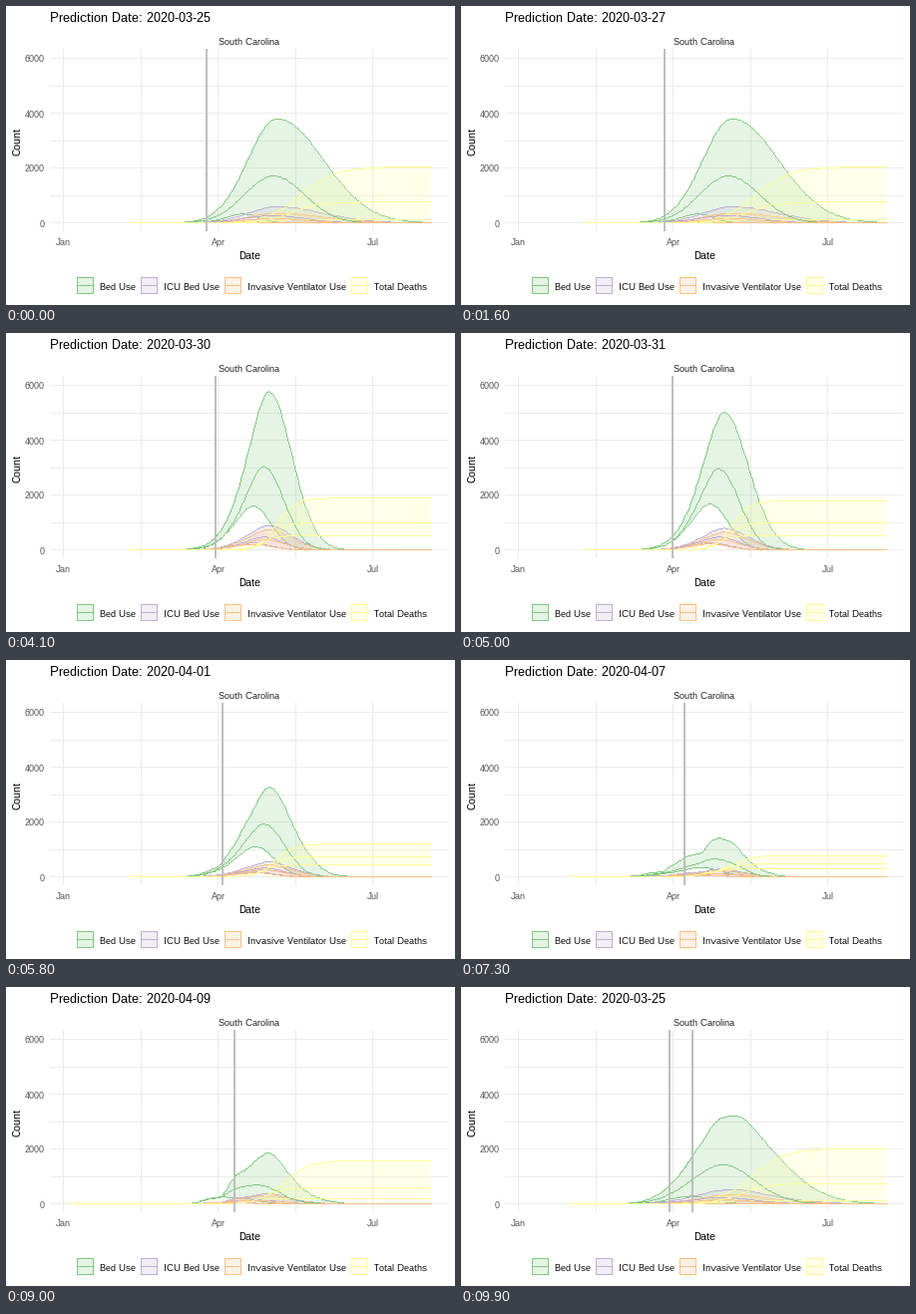
A matplotlib script that plays this animation: 450 px wide and 300 px high, repeating every 10000 ms.

```python
import numpy as np
import matplotlib.pyplot as plt
from matplotlib.animation import FuncAnimation
from matplotlib.patches import Rectangle

plt.rcParams.update({
    "font.family": "Liberation Sans",
    "text.hinting": "default",
    "text.hinting_factor": 1,
})

W, H, DPI = 450, 300, 100
STEP = 100
FRAMES = 100
DAY = 1.705              # pixels per day
JAN = 57.53              # pixel of January 1
LAST_DAY = 216
ZERO, PER_COUNT = 217.7, 0.0275

# name, colour, key x, label x
GROUPS = [("Bed Use", "#7FC97F", 71, 94),
          ("ICU Bed Use", "#BEAED4", 135, 158),
          ("Invasive Ventilator Use", "#FDC086", 219, 242),
          ("Total Deaths", "#FFFF99", 346, 369)]


# ---- curve shapes, all functions of pixel x ----
def bell(peak, mid, left, right, power=1.7):
    def f(x):
        z = np.where(x < mid, (mid - x) / left, (x - mid) / right)
        return peak * np.exp(-0.5 * z ** np.where(x < mid, power, 2))
    return f


def rise(top, mid, width):
    return lambda x: top / (1 + np.exp(-(x - mid) / width))


def knots(xs, ys):
    def f(x):
        y = np.interp(x, xs, ys)
        return np.convolve(np.pad(y, 1, mode="edge"), [0.25, 0.5, 0.25], "valid")
    return f


def scaled(f, k):
    return lambda x: k * f(x)


def forecast(start, bed, icu, vent, deaths):
    """Four arrays with the columns day, mean, low, high."""
    day = np.arange(start, LAST_DAY + 1.0)
    x = JAN + DAY * day
    sets = [bed, [scaled(f, icu) for f in bed],
            [scaled(f, vent) for f in bed], deaths]
    return [np.column_stack([day] + [f(x) for f in s]) for s in sets]


PAST_X, PAST_Y = [178, 190, 200, 215], [0, 50, 180, 260]


def split(xs, ys):
    return knots(PAST_X + xs, PAST_Y + ys)


mid_high = split([219, 235, 250, 258, 266, 275, 285, 300, 320],
                 [460, 940, 1100, 1450, 1500, 1110, 520, 170, 0])
late_high = split([218, 229, 240, 250, 257, 262, 266, 271, 280, 293, 305, 320, 342],
                  [420, 1070, 1290, 1650, 1860, 1925, 1880, 1690, 1250, 670, 345, 120, 0])
late_mean = split([222, 232, 245, 252, 258, 270, 285, 300, 325],
                  [480, 640, 735, 745, 725, 530, 200, 60, 0])
late_low = split([225, 240, 255, 275], [230, 200, 90, 0])
late_bed = [late_mean, late_low, late_high]

A = forecast(38, [bell(1720, 267, 29, 31, 2), bell(330, 237, 18, 15, 2),
                  bell(3800, 271, 29.5, 46, 2)], 0.155, 0.092,
             [rise(760, 285, 14), rise(110, 262, 8), rise(2040, 294, 17)])
B = forecast(38, [bell(3270, 254, 20, 20), bell(2290, 246, 18, 17),
                  bell(4790, 258, 21, 24)], 0.158, 0.115,
             [rise(1020, 265, 8), rise(670, 256, 7), rise(1560, 270, 10)])
C = forecast(38, [bell(3150, 257, 19, 20), bell(1650, 246, 18, 18),
                  bell(6050, 262, 20.5, 23)], 0.155, 0.128,
             [rise(1010, 266, 8), rise(520, 256, 7), rise(1910, 270, 9)])
D = forecast(38, [bell(2750, 257, 19, 20), bell(1530, 247, 18, 18),
                  bell(4970, 262, 20.5, 24)], 0.155, 0.128,
             [rise(980, 266, 8), rise(500, 256, 7), rise(1830, 270, 9)])
E = forecast(38, [bell(3200, 257, 20, 21), bell(1850, 249, 19, 19),
                  bell(5080, 262, 21, 26)], 0.16, 0.13,
             [rise(1020, 266, 8), rise(540, 257, 7), rise(1760, 270, 9)])
F = forecast(38, [bell(680, 258, 26, 19), bell(380, 248, 24, 18), mid_high],
             0.2, 0.16,
             [rise(460, 258, 9), rise(320, 250, 8), rise(640, 264, 10)])
G = forecast(3, late_bed, 0.2, 0.17,
             [rise(500, 256, 9), rise(200, 243, 8), rise(1200, 270, 11)])
I = forecast(3, [scaled(late_mean, 0.85), late_low, scaled(late_high, 0.95)],
             0.2, 0.17,
             [rise(700, 262, 10), rise(200, 245, 8), rise(1960, 282, 13)])

# first frame of the move away, day of year, label, data
STATES = [(5, 84, "03-25", A), (14, 85, "03-26", A), (23, 86, "03-27", A),
          (32, 88, "03-29", B), (41, 89, "03-30", C), (49, 90, "03-31", D),
          (57, 91, "04-01", E), (65, 95, "04-05", F), (73, 97, "04-07", F),
          (81, 98, "04-08", G), (89, 99, "04-09", G), (97, 102, "04-12", I)]


def stretch(a, n):
    """Add points along the path, evenly by length, until it has n rows."""
    extra = n - len(a)
    if extra <= 0:
        return a
    s = np.r_[0, np.cumsum(np.hypot(np.diff(a[:, 0]), np.diff(a[:, 1])))]
    new = (np.arange(extra) + 0.5) / extra * s[-1]
    at = np.sort(np.r_[s, new])
    return np.column_stack([np.interp(at, s, col) for col in a.T])


def blend(a, b, t):
    n = max(len(a), len(b))
    return (1 - t) * stretch(a, n) + t * stretch(b, n)


def pose(frame):
    """Label, line days and data at a frame."""
    for i, (go, day, label, data) in enumerate(STATES):
        t = (frame - go + 1) / 4
        if t <= 0:
            return label, [day], data
        if t < 1:
            _, day2, label2, data2 = STATES[(i + 1) % len(STATES)]
            days = [day + (day2 - day) * t]
            if day2 < day:
                days.append(day)
            mixed = [blend(a, b, t) for a, b in zip(data, data2)]
            return (label2 if t >= 0.75 else label), days, mixed


# ---- drawing helpers ----
fig = plt.figure(figsize=(W / DPI, H / DPI), dpi=DPI, facecolor="white")
ax = fig.add_axes([0, 0, 1, 1])
ax.set_xlim(0, W)
ax.set_ylim(H, 0)
ax.axis("off")
PX = 72 / DPI


def day_x(day):
    return np.floor(JAN + DAY * day)


def count_y(count):
    return np.floor(ZERO - PER_COUNT * count)


def trace(xs, ys):
    """Centres of the pixels on a polyline, for crisp one-pixel curves."""
    steps = np.maximum(np.abs(np.diff(xs)), np.abs(np.diff(ys)))
    s = np.r_[0, np.cumsum(np.maximum(steps, 1))]
    at = np.arange(s[-1] + 1)
    return [np.floor(np.interp(at, s, v) + 0.5) + 0.5 for v in (xs, ys)]


def curve(color, z):
    return ax.plot([], [], ",", color=color, zorder=z)[0]


def block(x, y, w, h, color, z, **kw):
    return ax.add_patch(Rectangle((x, y), w, h, fc=color, lw=0, zorder=z, **kw))


def text(x, y, s, size, color="black", ha="left", va="baseline", **kw):
    return ax.text(x, y, s, fontsize=size * PX, color=color, ha=ha, va=va,
                   zorder=30, **kw)


# ---- fixed parts ----
for count in range(0, 6001, 1000):
    y = count_y(count)
    block(44, y, 400, 1, "#EBEBEB", 1)
    if count % 2000 == 0:
        text(39, y + 4.5, str(count), 9, "#4D4D4D", "right")
for day in (0, 45.5, 91, 136.5, 182):
    block(day_x(day), 43, 1, 183, "#EBEBEB", 1)
for day, month in ((0, "Jan"), (91, "Apr"), (182, "Jul")):
    text(day_x(day) + 0.5, 240, month, 9, "#4D4D4D", "center")

title = text(44, 16, "", 13)
text(243.5, 39, "South Carolina", 9, "#1A1A1A", "center")
text(244, 254, "Date", 11, ha="center")
text(11.5, 136, "Count", 11, ha="center", va="center", rotation=90)

for name, color, x, tx in GROUPS:
    block(x, 272, 16, 16, color, 2, alpha=0.2)
    for y in (272, 280, 288):
        block(x, y, 17, 1, color, 3)
    for side in (x, x + 16):
        block(side, 272, 1, 17, color, 3)
    text(tx, 285, name, 9)

# ---- moving parts ----
bands, curves = [], []
for k, (_, color, _, _) in enumerate(GROUPS):
    bands.append(ax.fill([0, 0], [0, 0], color=color, alpha=0.2, lw=0,
                         zorder=5 + k)[0])
    curves.append([curve(color, z + k) for z in (12, 5.5, 5.5)])
bars = [block(0, 43, 2, 183, "#BEBEBE", 20) for _ in range(2)]


def draw(frame):
    label, days, data = pose(frame)
    title.set_text("Prediction Date: 2020-" + label)
    for i, bar in enumerate(bars):
        bar.set_visible(i < len(days))
        if i < len(days):
            bar.set_x(day_x(days[i]))
    for a, band, trio in zip(data, bands, curves):
        x = day_x(a[:, 0])
        mid, low, high = (count_y(a[:, j]) for j in (1, 2, 3))
        band.set_xy(np.column_stack([np.r_[x, x[::-1]] + 0.5,
                                     np.r_[high, low[::-1]] + 0.5]))
        for c, y in zip(trio, (mid, low, high)):
            c.set_data(*trace(x, y))
    return []


anim = FuncAnimation(fig, draw, frames=FRAMES, interval=STEP, repeat=True,
                     repeat_delay=0, blit=False)
plt.show()
```
